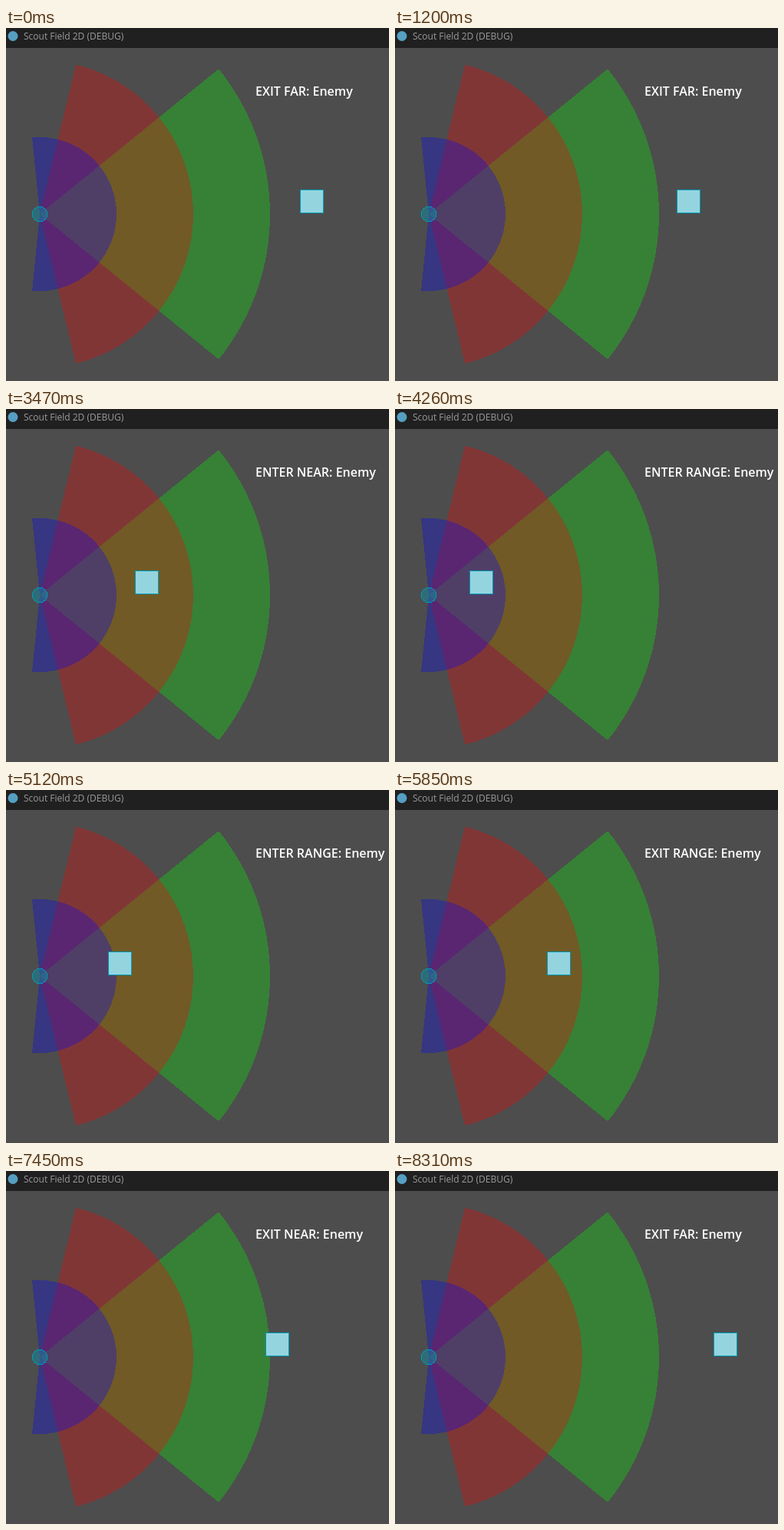
Write an HTML page that moves like this. It is 499 px wide and 459 px high and loops after 8.38 s.

```html
<!DOCTYPE html>
<html lang="en">
<head>
<meta charset="utf-8">
<title>Vision areas</title>
<style>
  html, body { margin: 0; width: 100%; height: 100%; overflow: hidden; background: #4d4d4d; }
  svg { display: block; }
  text { font: 12px "Open Sans", "Noto Sans", sans-serif; fill: #9b9b9b; }
  #label { font-size: 16px; font-weight: 600; fill: #fff; }
  #cones, .body { shape-rendering: crispEdges; }
  .body { stroke: #0099b3; }
</style>
</head>
<body>
<svg width="499" height="459">
  <rect width="499" height="26" fill="#202020"/>
  <circle cx="9" cy="10.5" r="6.5" fill="#559fc2"/>
  <text x="23" y="15">Scout Field 2D (DEBUG)</text>
  <g id="cones"></g>
  <circle class="body" cx="44" cy="242" r="9.7" fill="#0099b3" fill-opacity=".42"/>
  <rect class="body" id="enemy" y="210.5" width="30" height="30" fill="#94d4df"/>
  <text id="label" x="325" y="88"></text>
</svg>
<script>
const LOOP = 8380, TICK = 66.5, STEP = 5.867;
const EYE = { x: 44, y: 242 };
const enemy = document.getElementById('enemy');
const label = document.getElementById('label');

// radius, half angle in degrees, colour
const CONES = [
  [300, 39, 'rgb(0,247,0)'],
  [200, 76.4, 'rgb(247,0,0)'],
  [100, 95.7, 'rgb(0,0,250)']
];

// first tick of each message
const EVENTS = [
  [0, 'EXIT FAR'], [23, 'ENTER FAR'], [40, 'ENTER NEAR'], [57, 'ENTER RANGE'],
  [80, 'EXIT RANGE'], [97, 'EXIT NEAR'], [114, 'EXIT FAR']
];

function cone([radius, degrees, color]) {
  const half = degrees * Math.PI / 180;
  const x = EYE.x + radius * Math.cos(half);
  const dy = radius * Math.sin(half);
  const large = degrees > 90 ? 1 : 0;
  return `<path fill="${color}" fill-opacity=".3" d="M${EYE.x} ${EYE.y}
    L${x} ${EYE.y - dy} A${radius} ${radius} 0 ${large} 1 ${x} ${EYE.y + dy}Z"/>`;
}

// Constant speed, turning at both ends of the path
function enemyX(tick) {
  const outward = 427.9 - STEP * Math.abs(tick - 7.65);
  const back = 77.1 + STEP * (tick - 67.45);
  return Math.round(Math.max(outward, back));
}

function draw(time) {
  const tick = Math.floor(time % LOOP / TICK + 0.08);
  const message = EVENTS.filter(([start]) => start <= tick).pop()[1];
  enemy.setAttribute('x', enemyX(tick) + 0.5);
  label.textContent = message + ': Enemy';
}

document.getElementById('cones').innerHTML = CONES.map(cone).join('');

const begin = performance.now();
function frame() {
  draw(performance.now() - begin);
  requestAnimationFrame(frame);
}
frame();
</script>
</body>
</html>
```
